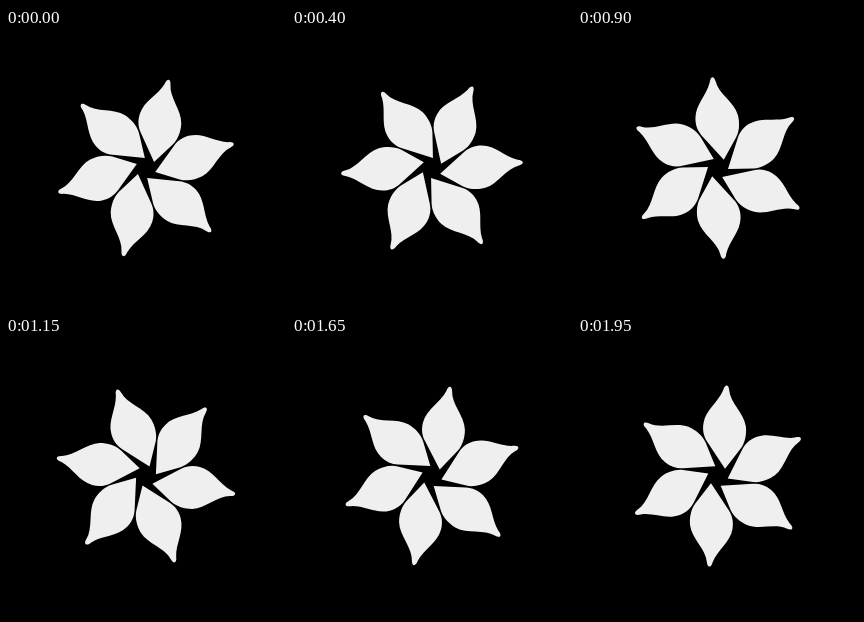
Recreate the animation shown at these times as an HTML page. Size 280 by 280 pixels, loop 2 s.

```html
<!DOCTYPE html>
<html lang="en">
<head>
<meta charset="utf-8">
<title>Spinning flower</title>
<style>
  html, body { margin: 0; width: 100%; height: 100%; overflow: hidden; background: #000; }
  svg { display: block; width: 280px; height: 280px; }
</style>
</head>
<body>
<svg viewBox="-140 -140 280 280">
  <defs>
    <path id="petal" d="M6.3 -7.8 L-14 -33 C-18 -38 -20 -44 -19.5 -51
      C-18.5 -65 -7 -73 -3 -86 C-2 -92.5 1.8 -92.5 2.8 -87
      C5 -74 20 -65 23 -52 C24.5 -45 24 -36 20 -29.5 Z"/>
  </defs>
  <g id="flower" fill="#efefef"></g>
</svg>
<script>
  const LOOP = 2000, STEPS = 40, START = 14.5, PETALS = 6;
  const flower = document.getElementById('flower');

  for (let i = 0; i < PETALS; i++) {
    const petal = document.createElementNS('http://www.w3.org/2000/svg', 'use');
    petal.setAttribute('href', '#petal');
    petal.setAttribute('transform', `rotate(${i * 360 / PETALS})`);
    flower.append(petal);
  }

  // One clockwise turn per loop, in even ticks.
  function draw() {
    const step = Math.floor(performance.now() % LOOP / LOOP * STEPS);
    flower.setAttribute('transform', `rotate(${START + step * 360 / STEPS})`);
    requestAnimationFrame(draw);
  }
  draw();
</script>
</body>
</html>
```
